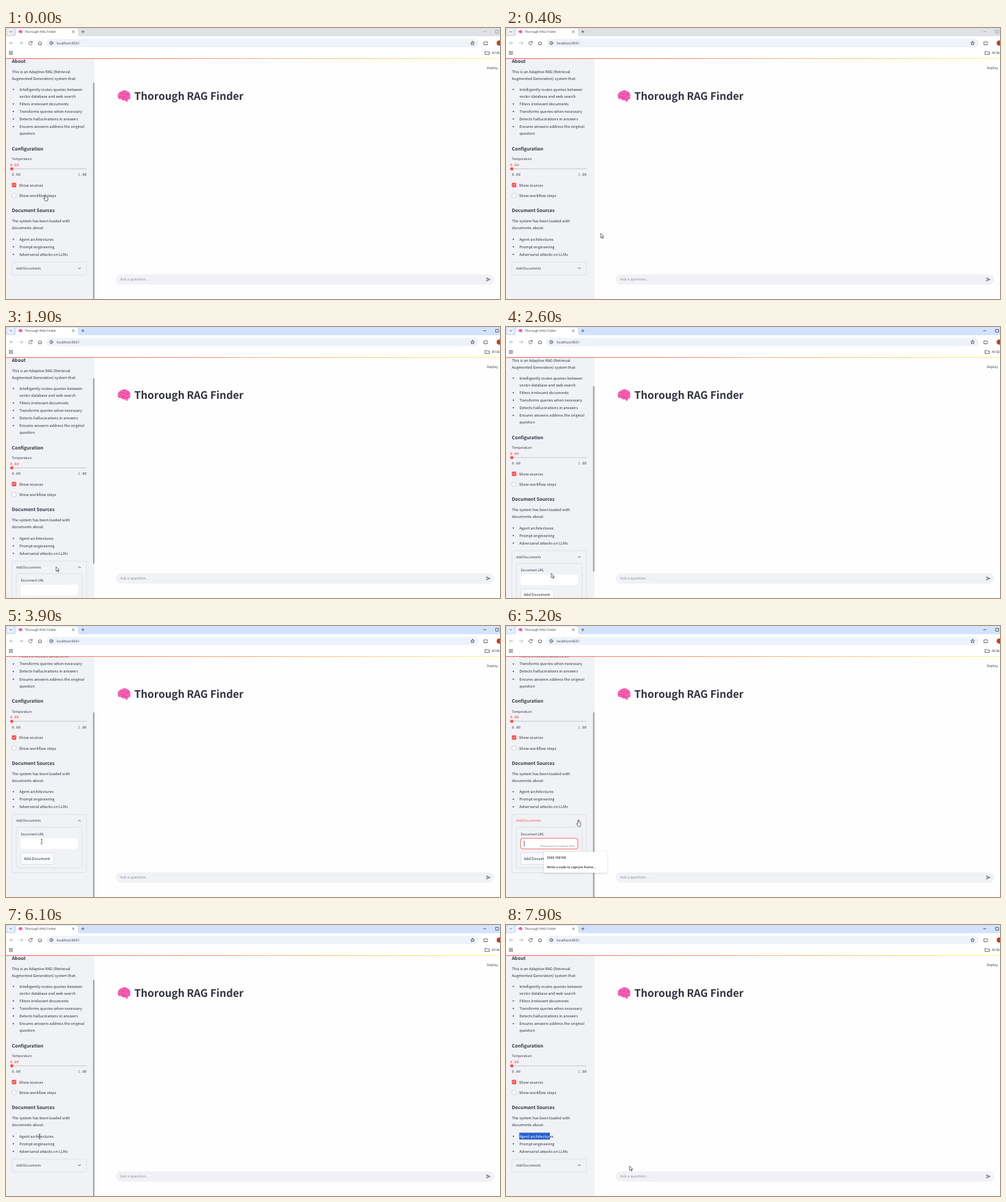
Animation, 720 px wide and 396 px high, one loop 8 s. Source, as an HTML page:

```html
<!DOCTYPE html>
<html lang="en">
<head>
<meta charset="utf-8">
<title>Thorough RAG Finder</title>
<style>
  html, body { margin: 0; width: 100%; height: 100%; overflow: hidden; background: #fefefe; }
  svg { display: block; width: 100vw; height: 100vh; }
  /* the tiny turn switches glyph hinting off, so small text keeps even spacing */
  text { font: 5.5px "Noto Sans CJK JP", "Noto Sans CJK SC", "Noto Sans CJK", "Noto Sans", sans-serif;
         fill: #31333f; text-rendering: geometricPrecision; white-space: pre; transform: rotate(.005deg); }
  .h1 { font-size: 15.2px; font-weight: 700; }
  .h3 { font-size: 6.75px; font-weight: 700; }
  .label { font-size: 4.85px; }
  .hint { font-size: 4.1px; fill: #8a8b93; }
  .mono { font: 5.3px "Noto Sans Mono", "Liberation Mono", monospace; fill: #5c5e68; }
  .chrome { font: 4.6px "Open Sans", "Noto Sans", sans-serif; fill: #33363b; }
  .menu { font: 600 4.7px "Open Sans", "Noto Sans", sans-serif; fill: #222; }
  .red { fill: #ff4b4b; }
  .line { fill: none; stroke: #4b4e54; stroke-width: .8; stroke-linecap: round; stroke-linejoin: round; }
  .box { fill: none; stroke: #d3d5db; stroke-width: .6; }
  .hover text { fill: #ff4b4b; }
  .hover path { stroke: #ff4b4b; }
</style>
</head>
<body>
<svg viewBox="0 0 720 396" preserveAspectRatio="none">
  <defs>
    <linearGradient id="stripe">
      <stop offset="0" stop-color="#ff4b4b"/><stop offset="1" stop-color="#fffd80"/>
    </linearGradient>
    <clipPath id="sideClip"><rect y="45" width="129" height="351"/></clipPath>
    <clipPath id="bodyClip"><rect id="bodyRect" x="8" y="342" width="110"/></clipPath>
    <clipPath id="pickClip"><rect id="pickRect" x="19.3" y="303" height="11"/></clipPath>
    <filter id="shadow" x="-10%" y="-20%" width="120%" height="150%">
      <feDropShadow dx="0" dy=".8" stdDeviation="1.2" flood-opacity=".25"/>
    </filter>
    <g id="brain">
      <path fill="#f962b5" d="M-9 1C-10-3-7-6-4-7C-1-9 3-9 5-7C8-6 10-3 9 1C10 4 8 5 6 5L5 8C4 9 2 8 2 6C-1 7-3 6-4 4C-7 5-9 4-9 1Z"/>
      <path fill="none" stroke="#d0388f" stroke-width=".8" stroke-linecap="round"
        d="M-6-3Q-4-5-2-3T2-4M-7 1Q-4-1-2 1T3 0Q5-1 4-3M-4 4Q-1 2 1 4T6 3M5-5Q7-4 6-1M0-7Q1-6 0-5"/>
    </g>
  </defs>

  <!-- browser -->
  <rect id="strip" width="720" height="12"/>
  <rect x="2" y="1" width="9.500" height="9" rx="2.500" fill="#fff" fill-opacity=".5"/>
  <path class="line" d="M5.500 4.800L7 6.300L8.500 4.800"/>
  <path fill="#fff" d="M12 12Q14.500 12 14.500 9V4Q14.500 1 17.500 1H102Q105 1 105 4V9Q105 12 107.500 12Z"/>
  <use href="#brain" transform="translate(21 5.500) scale(.3)"/>
  <text class="chrome" x="27" y="7.200">Thorough RAG Finder</text>
  <path class="line" d="M96.800 4.200L99.400 6.800M99.400 4.200L96.800 6.800M110.200 5.500H113.800M112 3.700V7.300"/>
  <path id="controls" class="line" d="M696 5.500H699.500M714 3.500H718V7.500H714Z"/>
  <rect y="12" width="720" height="32" fill="#fff"/>
  <path class="line" stroke-opacity=".45" d="M10.500 22H5.500M7.700 19.800L5.500 22L7.700 24.200M19.500 22H24.500M22.300 19.800L24.500 22L22.300 24.200"/>
  <path class="line" d="M37.700 20.500A2.500 2.500 0 1 0 38.200 23M38.200 19.300V21H36.500M47 22L49.500 19.600L52 22M47.700 21.500V24.500H51.300V21.500"/>
  <rect x="59" y="16" width="630" height="12" rx="6" fill="#eef2fa"/>
  <circle class="line" cx="66" cy="22" r="2.300"/>
  <path class="line" d="M66 21.800V23.200M66 20.700V20.800"/>
  <text class="chrome" x="74" y="23.800" style="font-size:4.950px">localhost:8501</text>
  <path class="line" d="M680 19.300L680.800 21.200L682.800 21.300L681.300 22.600L681.800 24.600L680 23.500L678.200 24.600L678.700 22.600L677.200 21.300L679.200 21.200Z"/>
  <path class="line" d="M697 20.300H698.500Q699 18.600 700 20.300H701.500V21.500Q703 22.300 701.500 23V24.500H697Z"/>
  <circle cx="719" cy="22" r="3.800" fill="#b6412d"/>
  <g id="apps" fill="#4b4e54"></g>
  <path class="line" d="M698.500 34.300H700.500L701.300 35.100H704.500V38.700H698.500Z"/>
  <text class="chrome" x="708" y="38.200" style="font-size:5px">All Bookmarks</text>

  <!-- page -->
  <rect y="44" width="720" height="352" fill="#fefefe"/>
  <text class="label" x="701" y="60.300">Deploy</text>
  <use href="#brain" x="172" y="99.500"/>
  <text class="h1" x="187" y="105.300">Thorough RAG Finder</text>
  <rect x="160" y="360" width="551.500" height="15" rx="7.500" fill="#f0f2f6"/>
  <text x="166.500" y="369.400" style="fill:#92939b">Ask a question...</text>
  <path fill="#85868f" d="M699.700 364.200L706.700 367.400L699.700 370.600L700.300 368L703.500 367.400L700.300 366.800Z"/>

  <!-- sidebar -->
  <rect y="44" width="129" height="352" fill="#f0f2f6"/>
  <g clip-path="url(#sideClip)">
    <g id="side">
      <g id="copy"></g>
      <rect x="8" y="205" width="110" height="1.500" rx=".75" fill="#d3d6dc"/>
      <circle class="red" cx="8.500" cy="205.800" r="2.400"/>
      <rect class="red" x="8.500" y="226.200" width="6.500" height="6.500" rx="1.300"/>
      <path class="line" style="stroke:#fff" d="M10.200 229.500L11.400 230.700L13.500 228.100"/>
      <rect class="box" x="8.800" y="241.900" width="5.900" height="5.900" rx="1.200" style="fill:#fff;stroke:#b9bbc3"/>

      <rect id="pick" x="19.300" y="303.500" height="10" fill="#2861cb"/>
      <text clip-path="url(#pickClip)" x="19.500" y="310.500" style="fill:#fff">Agent architectures</text>

      <rect id="expander" class="box" x="8.500" y="342" width="109" rx="3"/>
      <g id="header">
        <text class="label" x="15" y="352.900">Add Documents</text>
        <path id="chevron" class="line" d="M-1.700-.8L0 .9L1.700-.8"/>
      </g>
      <g clip-path="url(#bodyClip)">
        <rect class="box" x="15" y="360.500" width="96" height="59.500" rx="3"/>
        <text class="label" x="21.500" y="372.200">Document URL</text>
        <rect id="field" x="21.300" y="376.700" width="83.500" height="15.600" rx="3" fill="#fff" stroke-width=".8"/>
        <g id="typing">
          <path d="M26.500 380.500V388.500" stroke="#31333f" stroke-width=".7"/>
          <text class="hint" x="50" y="389.700">Press Enter to submit form</text>
        </g>
        <rect class="box" x="21.500" y="398" width="48.500" height="17" rx="3" style="fill:#f9fafc"/>
        <text x="26" y="408.400">Add Document</text>
      </g>
    </g>
  </g>
  <rect id="thumb" x="126.800" width="2.200" fill="#a5a7ad"/>
  <rect y="44.200" width="745" height=".9" fill="url(#stripe)"/>

  <g id="popup">
    <rect x="55" y="330" width="92.500" height="30.500" rx="2" fill="#fff" filter="url(#shadow)"/>
    <text class="menu" x="59.500" y="339.800">5550 100100</text>
    <text class="menu" x="59.500" y="353.800">Write a code to capture frame...</text>
  </g>

  <g id="cursor" stroke="#26272c" stroke-width=".65" stroke-linejoin="round" fill="#fff">
    <path data-kind="arrow" d="M0 0V6.600L1.500 5.200L2.600 7.700L3.700 7.200L2.600 4.800H4.700Z"/>
    <path data-kind="hand" d="M-1.300-4.200Q-.6-5 0-4.200V-1.200Q.6-1.900 1.100-1Q1.700-1.600 2.100-.6Q2.900-1 3 0V2.200L2.200 4.700H-1L-2.900 1.400Q-3 .3-2.100.6L-1.300 1.500Z"/>
    <path data-kind="beam" fill="none" d="M-1.300-3.400Q0-3.500 0-2.800Q0-3.500 1.300-3.400M0-2.800V2.800M-1.300 3.400Q0 3.500 0 2.800Q0 3.500 1.300 3.400"/>
  </g>
</svg>

<script>
const $ = id => document.getElementById(id);
const set = (id, attrs) => { for (const k in attrs) $(id).setAttribute(k, attrs[k]); };
const show = (node, on) => { node.style.display = on ? '' : 'none'; };

// Sidebar copy: [x, baseline, text, class]
const bullets = [
  [91.5, 'Intelligently routes queries between'], [112.7, 'Filters irrelevant documents'],
  [123.7, 'Transforms queries when necessary'], [134.7, 'Detects hallucinations in answers'],
  [146, 'Ensures answers address the original'], [310.5, 'Agent architectures'],
  [321.5, 'Prompt engineering'], [332.5, 'Adversarial attacks on LLMs']
];
const copy = [
  [8.5, 50.6, 'About', 'h3'],
  [8.5, 65.5, 'This is an Adaptive RAG (Retrieval'],
  [8.5, 75.7, 'Augmented Generation) system that:'],
  [19.5, 101.7, 'vector database and web search'],
  [19.5, 156.2, 'question'],
  [8.5, 178.5, 'Configuration', 'h3'],
  [8.5, 193.2, 'Temperature', 'label'],
  [6, 201.5, '0.00', 'mono red'],
  [8.5, 216.2, '0.00', 'mono'],
  [104.8, 216.2, '1.00', 'mono'],
  [19, 231.7, 'Show sources'],
  [19, 247.1, 'Show workflow steps'],
  [8.5, 269, 'Document Sources', 'h3'],
  [8.5, 284.1, 'The system has been loaded with'],
  [8.5, 294.3, 'documents about:'],
  ...bullets.map(([y, words]) => [19.5, y, words])
];
$('copy').innerHTML =
  copy.map(([x, y, words, kind = '']) => `<text x="${x}" y="${y}" class="${kind}">${words}</text>`).join('') +
  bullets.map(([y]) => `<circle cx="10.7" cy="${y - 1.8}" r=".9" fill="#31333f"/>`).join('');

$('apps').innerHTML = Array.from({ length: 9 }, (_, i) =>
  `<rect x="${4.5 + i % 3 * 2}" y="${33.8 + Math.floor(i / 3) * 2}" width="1.3" height="1.3"/>`).join('');

// Tables of [ms, value]
const LOOP = 8000, FIRST_CLICK = 1600;
const openSteps = [[0, 0], [FIRST_CLICK, 0], [1900, 1], [5200, 1], [5500, 0]];
const scrollSteps = [[0, 0], [2400, 0], [2600, 15], [2800, 45], [3000, 66.5]];
const pickSteps = [[0, 0], [6800, 0], [7500, 44.7]];
const cursorSteps = [
  [0, 58, 248, 'hand'], [100, 58, 248, 'hand'], [200, 85, 265, 'arrow'], [400, 138, 300, 'arrow'],
  [600, 138, 300, 'arrow'], [1100, 70, 320, 'arrow'], [1400, 74, 349, 'hand'], [1800, 74, 349, 'arrow'],
  [2600, 66, 360, 'arrow'], [3300, 56, 319, 'beam'], [3900, 52, 315, 'beam'], [4200, 50, 317, 'beam'],
  [4600, 50, 317, 'beam'], [4900, 80, 300, 'arrow'], [5100, 104, 289, 'hand'], [5200, 106, 288, 'hand'],
  [5400, 106, 288, 'arrow'], [5900, 56, 309, 'beam'], [6100, 49, 309, 'beam'], [6500, 22.5, 309, 'beam'],
  [6800, 22.5, 309, 'beam'], [7500, 64, 309, 'beam'], [7700, 73, 318, 'arrow'], [7900, 180, 352, 'arrow']
];

function at(steps, t, column = 1) {
  let i = steps.length - 1;
  while (i > 0 && steps[i][0] > t) i--;
  const a = steps[i], b = steps[i + 1];
  if (!b || typeof a[column] === 'string') return a[column];
  return a[column] + (b[column] - a[column]) * (t - a[0]) / (b[0] - a[0]);
}

const within = (t, from, to) => t >= from && t < to;

function draw(t) {
  const open = at(openSteps, t);
  const offset = Math.min(at(scrollSteps, t), 66.5 * open);
  const height = 19 + 66 * open;
  const active = t >= FIRST_CLICK;
  const focused = within(t, 4500, 5300);
  const picked = at(pickSteps, t);
  const [x, y, kind] = [1, 2, 3].map(column => at(cursorSteps, t, column));

  set('strip', { fill: active ? '#d3e3fd' : '#dfe1e6' });
  set('controls', { 'stroke-opacity': active ? 1 : .45 });
  set('side', { transform: `translate(0 ${-offset})` });
  set('expander', { height });
  set('bodyRect', { height: open ? height : 0 });
  set('chevron', { transform: `translate(107 351) rotate(${180 * open})` });
  set('header', { class: within(t, 1400, 1800) || within(t, 5100, 5400) ? 'hover' : '' });
  set('field', { stroke: focused ? '#ff4b4b' : 'none' });
  show($('typing'), focused);
  show($('popup'), focused);
  set('pick', { width: picked });
  set('pickRect', { width: picked });

  // The scrollbar shows only while the pointer is over the sidebar
  const view = 351, content = 390 + 65 * open;
  set('thumb', { y: 45 + (39 + offset) * view / content, height: view * view / content });
  show($('thumb'), x < 129);

  set('cursor', { transform: `translate(${x} ${y})` });
  for (const shape of $('cursor').children) show(shape, shape.dataset.kind === kind);
}

const start = performance.now();
function tick() {
  const t = (performance.now() - start) % LOOP;
  draw(Math.floor(t / 100) * 100);
  requestAnimationFrame(tick);
}
tick();
</script>
</body>
</html>
```
